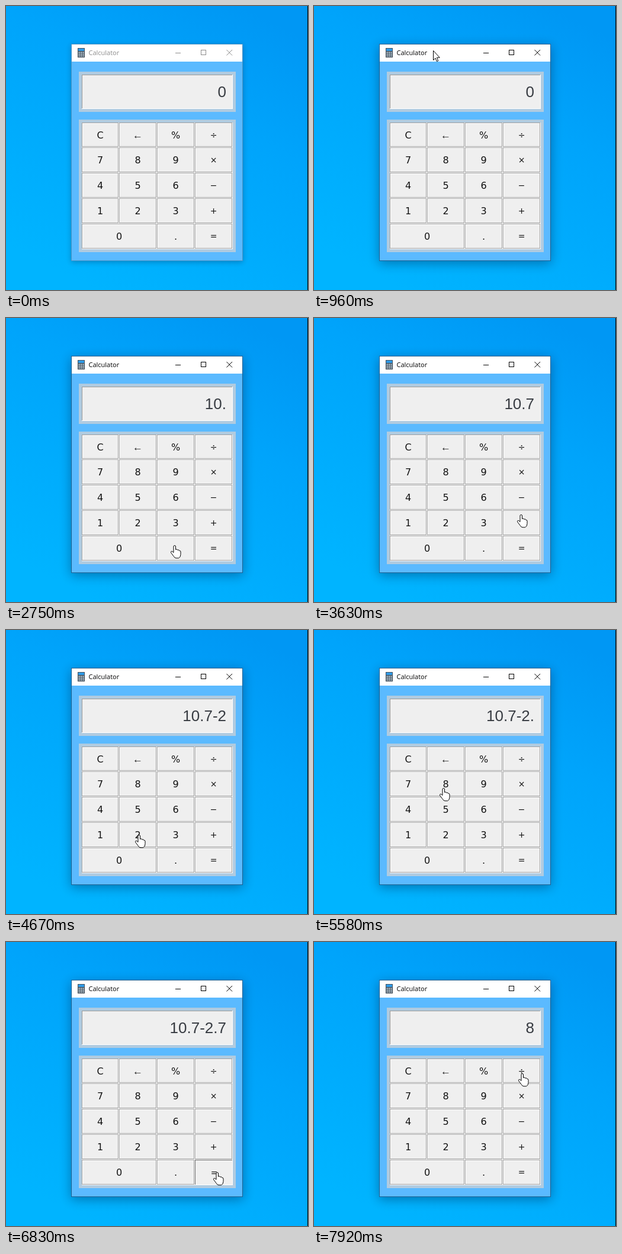
Write an HTML page with a canvas that moves like this. It is 510 px wide and 480 px high and loops after 8000 ms.

```html
<!DOCTYPE html>
<html lang="en">
<head>
<meta charset="utf-8">
<title>Calculator</title>
<style>
  html, body { margin: 0; width: 100%; height: 100%; overflow: hidden; }
  canvas { display: block; }
</style>
</head>
<body>
<canvas id="stage" width="510" height="480"></canvas>
<script>
const ctx = document.getElementById('stage').getContext('2d');
const LOOP = 8000, WINDOW_ACTIVE = 960;
const HOLD = 90, SETTLE = 60, MAX_TRAVEL = 710;

// Key layout: a space widens the key before it
const keys = {};
const columnEdge = c => 128 + Math.floor(63.75 * c);
const rowEdge = r => 197 + Math.floor(42.8 * r);
['C←%÷', '789×', '456−', '123+', '0 .='].forEach((row, r) => [...row].forEach((label, c) => {
  if (label === ' ') return;
  const x = columnEdge(c), y = rowEdge(r), span = row[c + 1] === ' ' ? 2 : 1;
  keys[label] = { x, y, w: columnEdge(c + span) - x, h: rowEdge(r + 1) - y };
}));

// Pointer stops: passing a point, hovering over a key, or pressing it
function pass(at, x, y) {
  return { arrive: at, leave: at, x, y };
}

function hover(at, label, dx = 3, dy = 0) {
  const k = keys[label];
  return pass(at, k.x + k.w / 2 + dx, k.y + k.h / 2 + dy);
}

function press(at, label, dx) {
  return { ...hover(at, label, dx), arrive: at - SETTLE, leave: at + HOLD + SETTLE, down: at, up: at + HOLD, label };
}

const stops = [
  pass(250, 378, 2), pass(790, 202, 75), pass(WINDOW_ACTIVE, 202, 75), hover(1460, '1'),
  press(1630, '1'), press(2140, '0'), press(2540, '.'), press(3250, '7'),
  hover(3630, '+', -2, -14), press(3860, '−'), press(4550, '2', 1), press(5050, '.'),
  hover(5580, '8', -4, 7), press(5800, '7'), press(6830, '=', 5), hover(7920, '÷', 0, 4)
];
const presses = stops.filter(stop => stop.label);

const hand = new Path2D('M5 12.5V2Q5.3.5 6.8.5T8.5 2V7.5Q9.8 6.4 11 7.2L11.8 8.3Q13 7.4 14.2 8.3L14.8 9.3Q16.8 9 17 11V15.5Q17 20.5 13.5 21.8H9Q6.5 21.5 5 18.5L1 13.2Q-.2 11 1.2 10.3T5 12.5Z');
const arrow = new Path2D('M.5 .5V16.5L4 13.2 6.4 18.6 8.8 17.6 6.4 12.2H11.3Z');

function box(x, y, w, h, color) {
  ctx.fillStyle = color;
  ctx.fillRect(x, y, w, h);
}

function frame(x, y, w, h, color) {
  ctx.strokeStyle = color;
  ctx.lineWidth = 1;
  ctx.strokeRect(x + .5, y + .5, w - 1, h - 1);
}

function write(text, x, y, font, color, align = 'center') {
  ctx.font = font;
  ctx.fillStyle = color;
  ctx.textAlign = align;
  ctx.fillText(text, x, y);
}

function sunken(x, y, w, h, dark) {
  box(x, y, w, h, '#fff');
  box(x, y, w - 1, h - 1, dark);
  box(x + 1, y + 1, w - 2, h - 2, '#efefef');
}

function groove(x, y, w, h) {
  box(x, y, w, h, '#efefef');
  frame(x + 1, y + 1, w - 1, h - 1, '#fff');
  frame(x, y, w - 1, h - 1, '#a0a0a0');
}

function drawDesktop() {
  const sky = ctx.createLinearGradient(150, 480, 400, 0);
  sky.addColorStop(0, '#00b4ff');
  sky.addColorStop(.65, '#00a4fb');
  sky.addColorStop(1, '#0097f4');
  box(0, 0, 510, 480, sky);
  box(509, 0, 1, 480, '#000');
}

function drawIcon() {
  box(121, 71, 12, 16, '#46515c');
  box(122, 72, 10, 4, '#2f9be8');
  for (let i = 0; i < 9; i++)
    box(122.5 + i % 3 * 3.4, 77.5 + Math.floor(i / 3) * 3, 2.2, 2, '#c6d9e4');
}

function drawWindow(active) {
  const ink = active ? '#000' : '#8c8c8c';
  ctx.save();
  ctx.shadowColor = active ? 'rgba(0,30,70,.42)' : 'rgba(0,30,70,.32)';
  ctx.shadowBlur = active ? 18 : 9;
  ctx.shadowOffsetY = active ? 4 : 2;
  box(110, 64, 290, 367, '#5bbaff');
  ctx.restore();
  box(111, 65, 288, 29, '#fff');
  frame(110, 64, 290, 367, active ? '#1d608f' : '#4b94c4');
  drawIcon();
  write('Calculator', 139.5, 83, '11px "Open Sans", sans-serif', ink, 'left');
  box(286, 79, 9, 1, ink);
  frame(329, 74, 9, 9, ink);
  ctx.beginPath();
  ctx.moveTo(372.5, 74); ctx.lineTo(382, 83.5);
  ctx.moveTo(382, 74); ctx.lineTo(372.5, 83.5);
  ctx.stroke();
}

function drawDisplay(text) {
  box(123, 111, 265, 68, '#b0cbe0');
  sunken(128, 116, 255, 58, '#9a9a9a');
  write(text, 372, 154, '26px "Liberation Sans", Arial, sans-serif', '#383c42', 'right');
}

function labelFont(label) {
  if (label === '←') return '17px "Liberation Sans", sans-serif';
  return ('÷×−+='.includes(label) ? 14 : 16) + 'px "DejaVu Sans", sans-serif';
}

function drawKeys(pressed) {
  box(123, 192, 265, 224, '#b0cbe0');
  for (const [label, { x, y, w, h }] of Object.entries(keys)) {
    const shift = label === pressed ? 1 : 0;
    if (shift) sunken(x, y, w, h, '#696969');
    else groove(x, y, w, h);
    const drop = '÷×−+='.includes(label) ? 5 : 6;
    write(label, x + w / 2 - .5 + shift, y + Math.floor(h / 2) + drop + shift, labelFont(label), '#111');
  }
}

function pointerAt(t) {
  const i = stops.findLastIndex(stop => stop.arrive <= t);
  const from = stops[i], to = stops[i + 1];
  if (!to) return from;
  const begin = Math.max(from.leave, to.arrive - MAX_TRAVEL);
  const u = Math.max(0, (t - begin) / (to.arrive - begin));
  const ease = u * u * (3 - 2 * u);
  return { x: from.x + (to.x - from.x) * ease, y: from.y + (to.y - from.y) * ease };
}

function drawPointer({ x, y }) {
  const overKeys = x >= 128 && x < 383 && y >= 197 && y < 411;
  const shape = overKeys ? hand : arrow;
  ctx.save();
  ctx.translate(Math.floor(overKeys ? x - 6 : x), Math.floor(y));
  ctx.fillStyle = '#fff';
  ctx.strokeStyle = '#000';
  ctx.lineWidth = 1;
  ctx.fill(shape);
  ctx.stroke(shape);
  ctx.restore();
}

function enter(text, { label }) {
  if (label === '=') {
    const [a, b] = text.split('-');
    return String(+(a - b).toFixed(9));
  }
  return text === '0' ? label : text + label.replace('−', '-');
}

function render(t) {
  const held = presses.find(({ down, up }) => t >= down && t < up);
  drawDesktop();
  drawWindow(t >= WINDOW_ACTIVE);
  drawDisplay(presses.filter(({ up }) => t >= up).reduce(enter, '0'));
  drawKeys(held && held.label);
  if (t >= stops[0].arrive) drawPointer(pointerAt(t));
}

const start = performance.now();
function tick() {
  render((performance.now() - start) % LOOP);
  requestAnimationFrame(tick);
}
tick();
</script>
</body>
</html>
```
